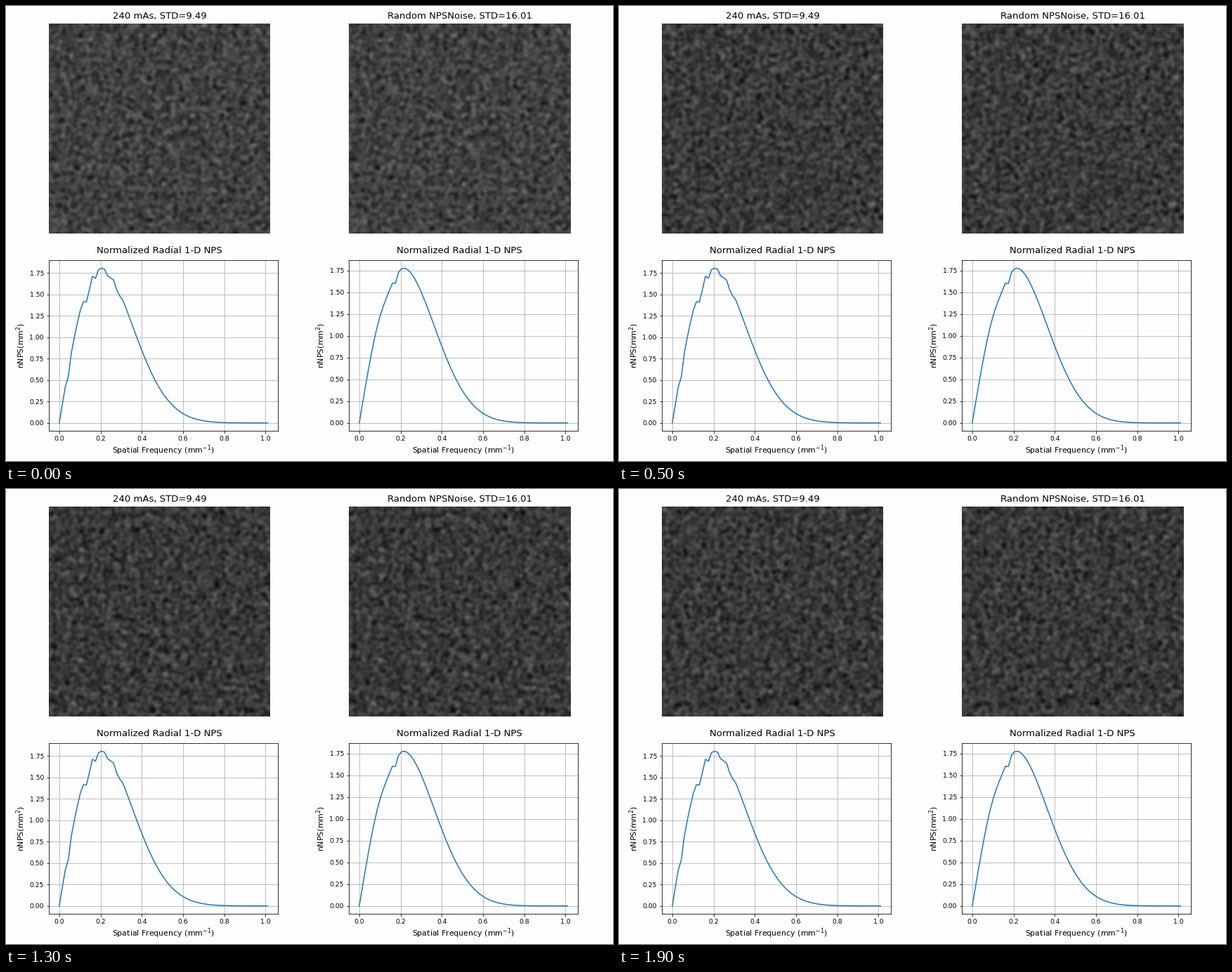
Animation, 864 px wide and 648 px high, one loop 2000 ms. Source, as a matplotlib script:

```python
import numpy as np
import matplotlib.pyplot as plt
from matplotlib.animation import FuncAnimation

W, H, DPI = 864, 648, 72
FRAMES, INTERVAL = 20, 100
COLS, ROWS = 140, 132          # noise cells per panel
PANEL_X = (61, 488)
IMG_Y, IMG_W, IMG_H = 25, 315, 299
PLOT_Y, PLOT_W, PLOT_H = 362.4, 326, 242.4
MID = 157.7                    # title centre, from the panel's left edge
BG = "#fefefe"
FREQ = np.linspace(0, 1.01, 70)

plt.rcParams.update({
    "font.family": "DejaVu Sans",
    "xtick.labelsize": 9.2,
    "ytick.labelsize": 9.2,
    "axes.labelsize": 11,
    "axes.labelpad": 3,
})


def spectrum(gain, falloff, steep, dips):
    """Ramp times a bell-shaped falloff, notched by (frequency, depth, width)."""
    f = FREQ
    y = gain * f * np.exp(-falloff * f ** 2 - steep * f ** 5)
    for at, depth, width in dips:
        y *= 1 - depth * np.exp(-((f - at) / width) ** 2)
    return y


def radial_filter(power):
    fy = np.fft.fftfreq(ROWS)[:, None]
    fx = np.fft.fftfreq(COLS)[None, :]
    r = np.hypot(fx, fy) * 2 * FREQ[-1]
    return np.sqrt(np.interp(r, FREQ, power, right=0))


def make_noise(i, amplitude):
    """Seeded white noise shaped by the spectrum, settling to a darker mean."""
    white = np.random.default_rng(40 + i).standard_normal((ROWS, COLS))
    grain = np.fft.ifft2(np.fft.fft2(white) * amplitude).real
    mean = 57 + 8 * np.exp(-i / 3)
    return np.clip(mean + 12.5 * grain / grain.std(), 5, 125)


def px_axes(x, y, w, h):
    return fig.add_axes([x / W, 1 - (y + h) / H, w / W, h / H])


def title(x, y, text):
    fig.text(x / W, 1 - y / H, text, fontsize=13.3, ha="center", va="baseline")


def add_image(x):
    ax = px_axes(x, IMG_Y, IMG_W, IMG_H)
    ax.axis("off")
    return ax.imshow(noise[0], cmap="gray", vmin=0, vmax=255, aspect="auto")


def add_plot(x, power):
    ax = px_axes(x, PLOT_Y, PLOT_W, PLOT_H)
    ax.set_facecolor(BG)
    ax.plot(FREQ, power, color="#1f77b4", lw=1.5)
    ax.set_xticks(np.arange(0, 1.01, .2))
    ax.set_yticks(np.arange(0, 1.76, .25))
    ax.grid(True)
    ax.set_xlabel("Spatial Frequency (mm$^{-1}$)")
    ax.set_ylabel("nNPS(mm$^2$)")


fig = plt.figure(figsize=(W / DPI, H / DPI), dpi=DPI, facecolor=BG)

measured = spectrum(14.6, 12, .8, [(.044, .14, .008), (.135, .10, .015),
                                   (.178, .05, .008), (.24, .04, .01),
                                   (.285, .04, .012)])
simulated = spectrum(14.1, 11.4, 3, [(.14, .06, .05), (.178, .05, .008)])

amplitude = radial_filter(measured)
noise = [make_noise(i, amplitude) for i in range(FRAMES)]

images = []
heads = "240 mAs, STD=9.49", "Random NPSNoise, STD=16.01"
for x, head, power in zip(PANEL_X, heads, (measured, simulated)):
    images.append(add_image(x))
    add_plot(x, power)
    title(x + MID, 18, head)
    title(x + MID, 352, "Normalized Radial 1-D NPS")


def update(i):
    for image in images:
        image.set_data(noise[i])
    return images


anim = FuncAnimation(fig, update, frames=FRAMES, interval=INTERVAL,
                     init_func=lambda: update(0), repeat=True, repeat_delay=0)
plt.show()
```
